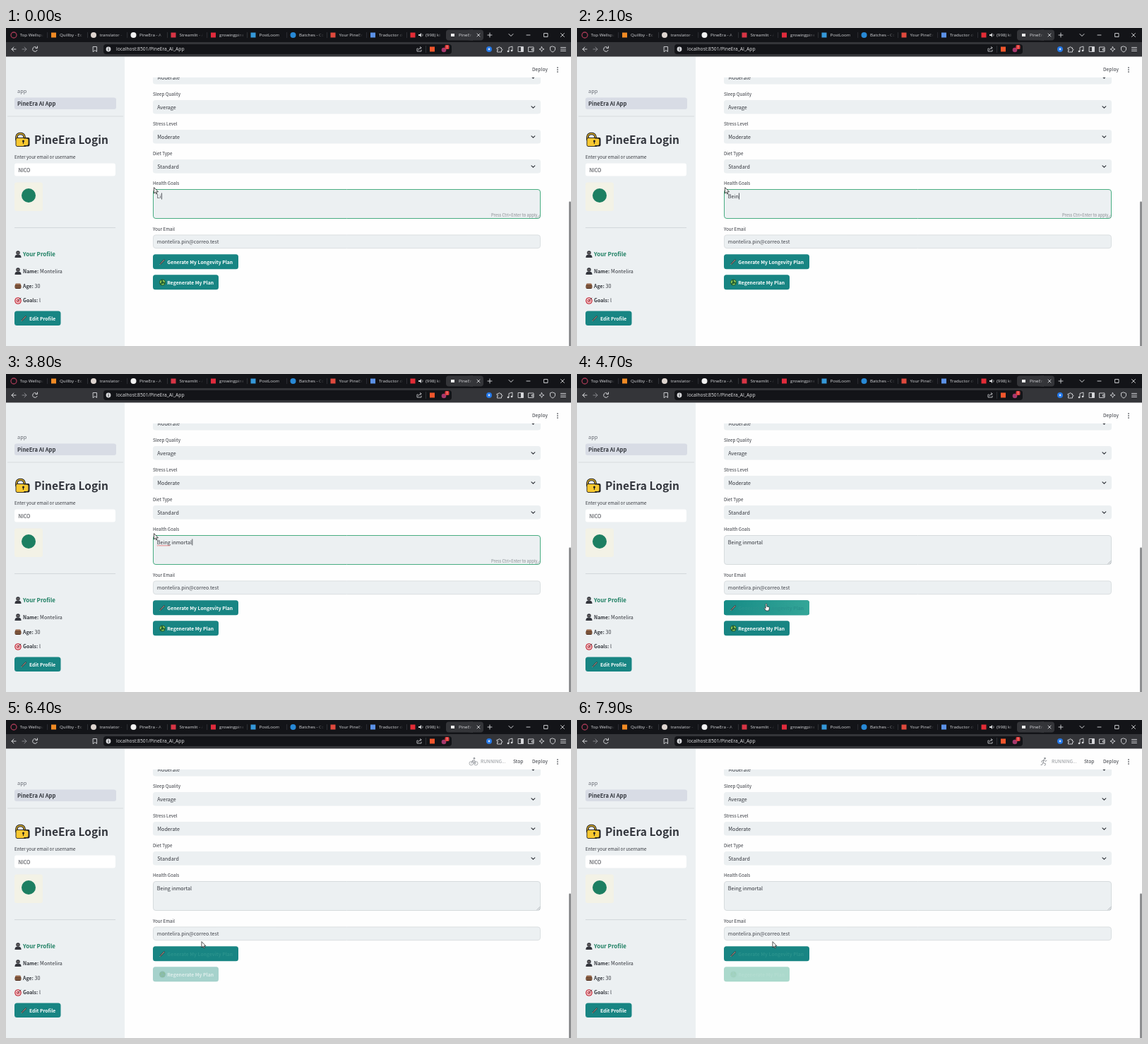
An HTML page with a canvas that plays this animation: 800 by 450 pixels, repeating every 8 s.

```html
<!DOCTYPE html>
<html lang="en">
<head>
<meta charset="utf-8">
<title>Health goals form</title>
<style>
html, body { margin: 0; width: 100%; height: 100%; overflow: hidden; background: #fff; }
canvas { display: block; width: 800px; height: 450px; }
</style>
</head>
<body>
<canvas id="stage" width="800" height="450"></canvas>
<script>
const ctx = document.getElementById('stage').getContext('2d');
const LOOP = 8000;
const PAGE = '"Noto Sans CJK JP","Noto Sans CJK SC","Noto Sans",sans-serif';
const CHROME = '"Open Sans","Noto Sans",sans-serif';
const INK = '#31343b', FIELD = '#ecf0f2', TEAL = '#188583', GREEN = '#1d7f62';
const STRIP = '#131418', BAR = '#343539', PALE = '#d9dadd';
const GOAL = 'Being inmortal';

const clamp = v => Math.max(0, Math.min(1, v));
const part = (t, a, b) => clamp((t - a) / (b - a));
const ease = v => v * v * (3 - 2 * v);
const blend = (a, b, k) => `rgb(${a.map((v, i) => Math.round(v + (b[i] - v) * k))})`;

// y is the middle of the capitals; returns the text width
function text(s, x, y, size, color = INK, weight = 400, font = PAGE) {
  ctx.save();
  ctx.translate(x, y + size * 0.37);
  ctx.scale(0.1, 0.1);
  ctx.font = `${weight} ${size * 10}px ${font}`;
  ctx.fillStyle = color;
  ctx.fillText(s, 0, 0);
  const w = ctx.measureText(s).width / 10;
  ctx.restore();
  return w;
}

function rect(x, y, w, h, color) {
  ctx.fillStyle = color;
  ctx.fillRect(x, y, w, h);
}

function box(x, y, w, h, r, fill, stroke) {
  ctx.beginPath();
  ctx.roundRect(x, y, w, h, r);
  if (fill) { ctx.fillStyle = fill; ctx.fill(); }
  if (stroke) { ctx.strokeStyle = stroke; ctx.lineWidth = 0.9; ctx.stroke(); }
}

function disc(x, y, r, color) {
  ctx.beginPath();
  ctx.arc(x, y, r, 0, 7);
  ctx.fillStyle = color;
  ctx.fill();
}

function ring(x, y, r, color, width = 1, a = 0, b = 6.3) {
  ctx.beginPath();
  ctx.arc(x, y, r, a, b);
  ctx.strokeStyle = color;
  ctx.lineWidth = width;
  ctx.stroke();
}

// SVG path placed at x, y
function shape(x, y, d, stroke, width = 1, fill) {
  ctx.save();
  ctx.translate(x, y);
  const p = new Path2D(d);
  ctx.lineJoin = ctx.lineCap = 'round';
  if (fill) { ctx.fillStyle = fill; ctx.fill(p); }
  if (stroke) { ctx.strokeStyle = stroke; ctx.lineWidth = width; ctx.stroke(p); }
  ctx.restore();
}

const tabs = [
  ['Top Wellspan', '#a53a55', 'ring'], ['Quillby - Ec', '#f08a24'],
  ['translator - ', '#ddd4cf', 'disc'], ['PineEra - A', '#f2f2f2', 'disc'],
  ['Streamlit - A', '#d83545'], ['growingpine', '#e02b3c'],
  ['PostLoom', '#3598d8'], ['Batches - Co', '#2889d6', 'disc'],
  ['Your PineEr', '#df493d'], ['Traductor de', '#5b91e6'],
  ['(998) ki', '#e32c36'], ['PineEra', '#f0f0f0']
];

function drawTabs() {
  rect(0, 0, 800, 20, STRIP);
  box(623, 2.5, 53, 15, 4, BAR);
  tabs.forEach(([name, color, kind], i) => {
    const x = 11 + i * 56.5;
    const active = i === 11, sound = i === 10;
    const bg = active ? BAR : STRIP;
    if (kind === 'ring') ring(x, 10, 4, color, 1.3);
    else if (kind) disc(x, 10, 4, color);
    else if (active) rect(x - 2.5, 8, 5, 4, color);
    else rect(x - 3.5, 6.5, 7, 7, color);
    const start = x + (sound ? 18 : 8.5);
    const end = active ? 661 : x + 42;
    ctx.save();
    ctx.beginPath();
    ctx.rect(start, 2, end - start, 16);
    ctx.clip();
    text(name, start, 10, 6.2, PALE, 400, CHROME);
    const fade = ctx.createLinearGradient(end - 8, 0, end, 0);
    fade.addColorStop(0, bg + '00');
    fade.addColorStop(1, bg);
    rect(end - 8, 2, 8, 16, fade);
    ctx.restore();
    if (sound) {
      shape(x + 8, 7, 'M0 2H2L4 0V6L2 4H0Z', null, 1, PALE);
      ring(x + 12, 10, 2, PALE, 0.7, -1, 1);
    }
    if (i < 10) rect(x + 47.5, 6, 0.6, 8, '#404148');
  });
  shape(667, 8, 'M0 0L4 4M4 0L0 4', PALE, 0.9);
  shape(682, 7, 'M3 0V6M0 3H6', PALE, 0.9);
  shape(712, 8.5, 'M0 0L3 3L6 0', PALE, 1);
  shape(737, 10, 'M0 0H5', PALE, 0.9);
  shape(762, 7.5, 'M0 0H5V5H0Z', PALE, 0.9);
  shape(785.5, 7.5, 'M0 0L5 5M5 0L0 5', PALE, 0.9);
}

function drawToolbar() {
  rect(0, 20, 800, 20.5, BAR);
  box(138, 23, 493, 14, 4, STRIP);
  shape(8, 27, 'M6 3H0M3 0L0 3L3 6', PALE, 1);
  shape(23, 27, 'M0 3H6M3 0L6 3L3 6', '#85868b', 1);
  ring(41, 30, 3.2, PALE, 1, 0.3, 5.5);
  shape(42, 26, 'M2.5 0V2.5H0', PALE, 1);
  shape(123.5, 26.5, 'M0 0H5V7L2.5 5L0 7Z', PALE, 0.9);
  disc(145, 30, 3.4, PALE);
  rect(144.6, 29.4, 0.9, 2.6, STRIP);
  rect(144.6, 27.8, 0.9, 0.9, STRIP);
  text('localhost:8501/PineEra_AI_App', 156, 30, 6.75, '#e6e6e8', 400, CHROME);
  shape(582, 27, 'M1 2H0V6H6V4M2 4C2 2 4 1 6 1M4.5 -.5L6 1L4.5 2.5', PALE, 0.8);
  rect(594, 25, 0.6, 10, '#44454b');
  rect(600, 26.5, 7, 7, '#f0562c');
  disc(620, 31, 3.3, '#a5386c');
  box(621.5, 24, 6, 6, 1.5, '#e13b3b');
  text('1', 623.4, 27, 4.5, '#fff', 400, CHROME);
  disc(684, 30, 4, '#2478e8');
  disc(684, 30, 1.4, '#cfe0fa');
  shape(695.5, 27, 'M0 1H2C1.5 -1 4.5 -1 4 1H6V3C8 2.5 8 5 6 4.7V7H0V4.7C2 5 2 2.5 0 3Z', PALE, 0.9);
  shape(712, 26, 'M0 7V1.5L5 0V6', PALE, 0.9);
  disc(711, 33, 1.3, PALE);
  disc(716, 32, 1.3, PALE);
  shape(725.5, 26.5, 'M0 0H7V7H0Z', PALE, 0.9);
  rect(729, 27, 3.5, 6.5, PALE);
  shape(740, 27, 'M0 0H7V6.5H0ZM7 2.5H4.5V4.5H7', PALE, 0.9);
  shape(755.5, 26.5, 'M3 0L4 2.5L6.5 3.5L4 4.5L3 7L2 4.5L-.5 3.5L2 2.5Z', PALE, 0.8);
  shape(770.5, 26, 'M3.5 0L7 1.3V4C7 6 5 7.5 3.5 8C2 7.5 0 6 0 4V1.3Z', PALE, 0.9);
  shape(785.5, 27.5, 'M0 0H7M0 2.5H7M0 5H7', PALE, 0.9);
}

function pencil(x, y) {
  shape(x, y, 'M-2.8 2.8L2.5 -2.7', '#33363b', 2);
  shape(x, y, 'M-1.6 1.5L2.4 -2.7', '#dcb7a4', 0.9);
  shape(x, y, 'M-3.3 3.3L-2.7 2.7', '#f1e2c0', 1);
}

function person(x, y) {
  disc(x, y - 2, 2.8, '#34363d');
  shape(x, y, 'M-4.5 5C-4.5 1 -2 .8 0 .8S4.5 1 4.5 5Z', null, 1, '#34363d');
  rect(x - 1.7, y - 2.4, 3.4, 1, '#9a9089');
}

function cake(x, y) {
  box(x - 4.5, y - 2, 9, 6, 2, '#5a3827');
  box(x - 4, y - 3.5, 8, 3, 1.5, '#94664a');
  rect(x - 4.5, y + 1, 9, 0.8, '#b98c62');
}

function target(x, y) {
  [[4.8, '#c72f3d'], [3.4, '#f6eeee'], [2.3, '#d33442'], [1, '#fff']].forEach(([r, c]) => disc(x, y, r, c));
  shape(x, y, 'M0 0L4 -4', '#34454a', 0.9);
}

function recycle(x, y) {
  disc(x, y, 4.5, '#235f35');
  for (let i = 0; i < 3; i++) {
    const a = i * 2.094 - 1.4;
    ring(x, y, 2.7, '#91cc57', 1.6, a, a + 1.35);
  }
}

// open padlock: the shackle leans out over the left edge
function padlock() {
  shape(15, 149, 'M0 9V5C0 -1 11 -1 11 5V8', '#1d1d20', 3.6);
  shape(15, 149, 'M0 9V5C0 -1 11 -1 11 5V8', '#e9b92c', 1.3);
  box(14, 155.5, 15, 12, 2, '#f8c830', '#1d1d20');
  box(25, 155, 8.5, 12.5, 2, '#1d1d20');
  box(19.5, 156.5, 12, 9.5, 2, '#f8c830');
  disc(24.5, 160, 1.5, '#1d1d20');
  rect(23.9, 160, 1.2, 3.8, '#1d1d20');
}

function drawSidebar() {
  rect(0, 40.5, 168, 410, FIELD);
  text('app', 16, 89.5, 7.4, '#686c74');
  box(12, 98.5, 144, 16.5, 3, '#d8dce5');
  text('PineEra AI App', 16, 107, 7.6, INK, 700);
  rect(2, 124.5, 164, 1, '#d9dde0');
  padlock();
  text('PineEra Login', 40, 158, 15.5, INK, 700);
  text('Enter your email or username', 12, 182.5, 6.28);
  box(12, 191.5, 143, 18, 3, '#fff');
  text('NICO', 17.5, 201, 7.1);
  box(12, 218.5, 40, 40.5, 3, '#f3f2e6');
  disc(32, 237, 10, GREEN);
  rect(12, 282.3, 143, 0.8, '#cbd0d4');
  person(17, 320);
  text('Your Profile', 24, 320, 8, GREEN, 700);
  person(17, 344);
  const rows = [['Name:', 'Montelira', 344], ['Age:', '30', 365], ['Goals:', 'l', 385.5]];
  rows.forEach(([key, value, y]) => {
    const w = text(key, 24, y, 6.95, INK, 700);
    text(value, 24 + w + 1.8, y, 7.15);
  });
  cake(17, 365);
  target(17, 386);
  box(12, 400.5, 65.5, 20.5, 3.5, TEAL);
  pencil(25.5, 411);
  text('Edit Profile', 33, 411, 6.8, '#fff', 700);
}

function select(label, value, y) {
  if (label) text(label, 208, y - 18, 6.28);
  box(208, y - 10, 549, 19.5, 3.5, FIELD);
  text(value, 214.3, y + 0.3, 7.15);
  shape(744, y - 1.2, 'M0 0L2.4 2.4L4.8 0', INK, 1.2);
}

function goalText(t) {
  if (t < 600) return 'Li';
  if (t < 850) return 'L';
  return GOAL.slice(0, Math.max(0, Math.min(14, 4 + Math.floor((t - 2100) / 150))));
}

function drawGoals(t) {
  const focus = t < 4500;
  const s = goalText(t);
  text('Health Goals', 208, 220, 6.28);
  box(208.5, 228.5, 548, 41, 3.5, FIELD, focus ? '#35a474' : '#d3d8db');
  const w = text(s, 213.8, 238.3, 7.15);
  shape(752, 264.5, 'M0 4L4 0M2.5 4L4 2.5', '#858a8f', 0.6);
  if (!focus) return;
  rect(214.2 + w, 233.5, 0.8, 9, INK);
  text('Press Ctrl+Enter to apply', 687, 265, 5.7, '#858a8f');
  if (s.length > 5) {
    let d = 'M0 0';
    for (let x = 1; x < 19; x++) d += `L${x} ${x % 2 ? 0.9 : -0.3}`;
    shape(214, 242.5, d, '#dd4a50', 0.6);
  }
}

function drawButtons(t) {
  const hover = part(t, 4500, 4620) * (1 - part(t, 4900, 5000));
  const pressed = part(t, 4500, 4650);
  box(208, 320.3, 121, 21, 3.5, TEAL);
  ctx.globalAlpha = hover;
  const g = ctx.createLinearGradient(208, 0, 329, 0);
  g.addColorStop(0, '#168b86');
  g.addColorStop(1, '#34a698');
  box(208, 320.3, 121, 21, 3.5, g);
  ctx.globalAlpha = 1;
  pencil(221.5, 331);
  text('Generate My Longevity Plan', 228.3, 331, 6.8, blend([255, 255, 255], [42, 147, 141], pressed), 700);

  // the stale button pales, then its label fades
  const stale = part(t, 5050, 5400), fade = part(t, 5500, 7700);
  ctx.globalAlpha = 1 - 0.6 * stale;
  box(208, 349.3, 93, 21, 3.5, blend([24, 133, 131], [45, 160, 127], fade));
  ctx.globalAlpha = (1 - 0.7 * stale) * (1 - 0.8 * fade);
  recycle(221.5, 360);
  ctx.globalAlpha = 1 - 0.9 * fade;
  text('Regenerate My Plan', 228.3, 360, 6.8, '#fff', 700);
  ctx.globalAlpha = 1;
}

function drawStatus(t) {
  text('Deploy', 745, 59, 6.7);
  [56, 59, 62].forEach(y => disc(781, y, 0.85, INK));
  if (t < 4950) return;
  const grey = '#92969b';
  if (Math.floor((t - 5000) / 900) % 3 === 1) {
    ring(658.7, 61.3, 2.7, grey, 0.8);
    ring(665.3, 61.3, 2.7, grey, 0.8);
    shape(658.7, 61.3, 'M0 0L2 -4L4.5 0L6.5 0L4.5 -4.5L2 -4', grey, 0.9);
    disc(663, 54.3, 1.3, grey);
  } else {
    const k = Math.sin((t - 5500) / 120) * 0.7;
    disc(662.5, 54.3, 1.4, grey);
    shape(661, 56.5, `M0 0L-1 4L${2 + k} 5.5L${2 - k} 8M-1 4L${-2 - k} 7H-4M0 0L-3 ${1 + k}L-3 3M0 0L2 2L4 ${1.5 - k}`, grey, 1);
  }
  text('RUNNING...', 672, 59, 6.7, '#8f9398');
  text('Stop', 718, 59, 6.7);
}

function drawPointer(t) {
  const a = ease(part(t, 4050, 4550)), b = ease(part(t, 4850, 5200));
  const x = 209.5 + 58 * a + 9.5 * b;
  const y = 226 + 99 * a - 11 * b;
  if (t > 4480 && t < 4980) {
    shape(x, y, 'M-.5 1C-.5 -.3 1.3 -.3 1.3 1V4L4.2 4.7Q5.2 5.2 4.8 7L4 10H0L-2.3 6.5Q-2 5 -.5 6.3Z', '#2d2f32', 0.8, '#fff');
  } else {
    shape(x, y, 'M0 0V8L1.9 6.3L3.2 9L4.4 8.4L3.1 5.8H5.6Z', '#222', 0.8, '#fff');
  }
}

function draw(t) {
  rect(0, 0, 800, 450, '#fefefe');
  select('', 'Moderate', 70);
  rect(168, 40, 632, 30, '#fefefe');
  select('Sleep Quality', 'Average', 112);
  select('Stress Level', 'Moderate', 154);
  select('Diet Type', 'Standard', 196);
  drawGoals(t);
  text('Your Email', 208, 284.5, 6.28);
  box(208.5, 292.9, 548, 18.7, 3.5, FIELD, '#d9dddf');
  text('montelira.pin@correo.test', 213.8, 302.5, 7.15, '#42454c');
  drawButtons(t);
  drawSidebar();
  drawStatus(t);
  box(797, 245.5, 3, 205, 1, '#8d8e90');
  drawTabs();
  drawToolbar();
  drawPointer(t);
}

const begin = performance.now();
function tick() {
  draw((performance.now() - begin) % LOOP);
  requestAnimationFrame(tick);
}
tick();
</script>
</body>
</html>
```
